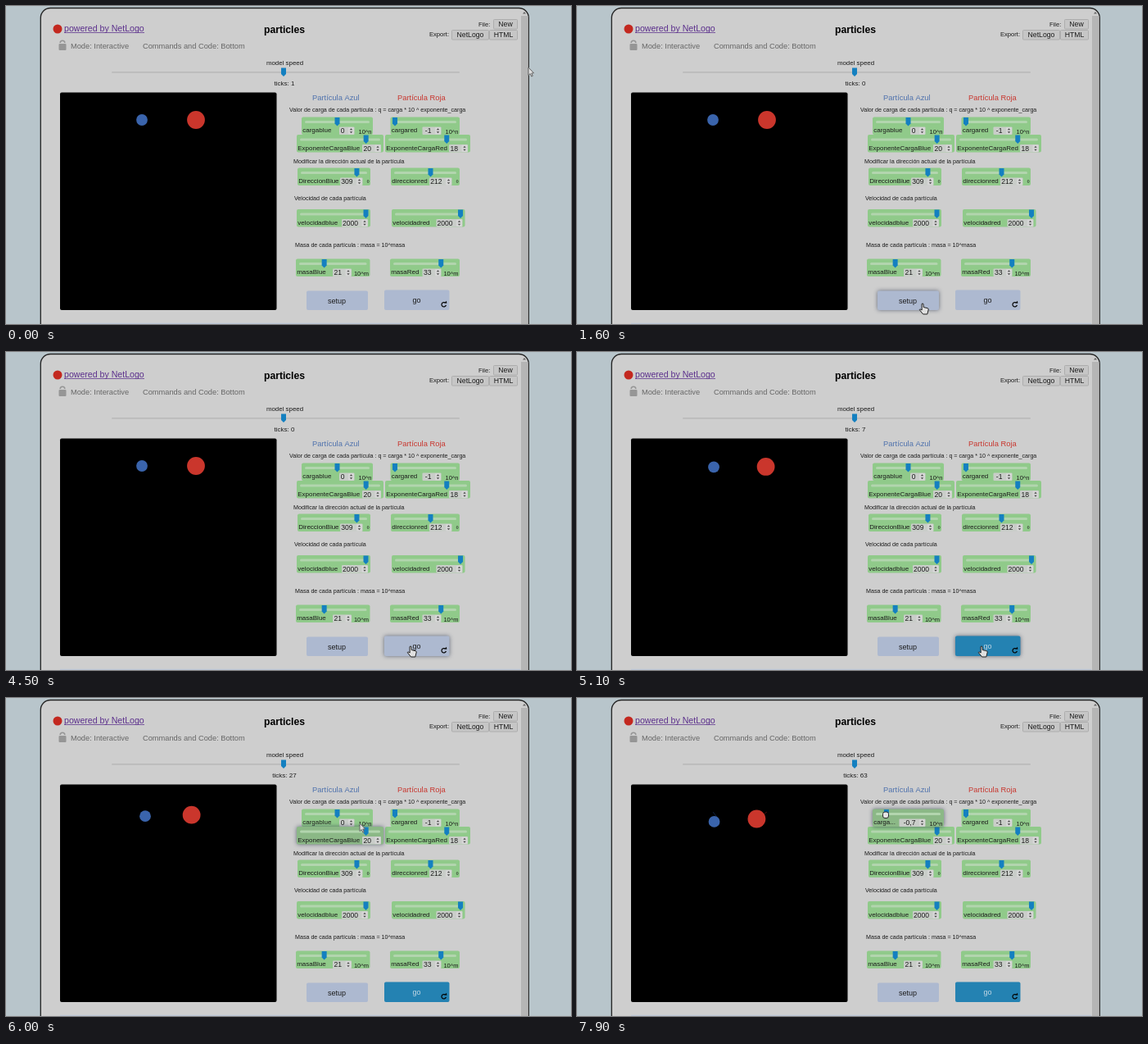
Animation of 690 by 388 pixels, one loop 8 s. Source, as an HTML page with a canvas:

```html
<!DOCTYPE html>
<html lang="es">
<head>
<meta charset="utf-8">
<title>particles</title>
<style>
  html, body { margin: 0; width: 100%; height: 100%; overflow: hidden; background: #b8c5cb; }
  canvas { display: block; }
</style>
</head>
<body>
<canvas id="stage" width="690" height="388"></canvas>
<script>
const ctx = document.getElementById('stage').getContext('2d');
const DURATION = 8000, STEP = 100, HOVER_LAG = 150;
const SETUP_AT = 1400, GO_AT = 4700, GRAB_AT = 6400, DRAG_AT = 7000, DRAG_END = 7800;
const INK = '#1c1c1c', BUTTON = '#adb9d0';

const smooth = u => u * u * (3 - 2 * u);
const linear = u => u;

// Keys are [time, value, ...]
const pointerKeys = [[150, 638, 75], [500, 500, 358], [680, 422, 363], [1900, 422, 363], [2500, 494, 359],
  [5200, 494, 359], [6000, 432, 153], [GRAB_AT, 404, 141], [DRAG_AT, 404, 141], [DRAG_END, 377, 142]];
const tickKeys = [[4800, 0], [5100, 7], [6000, 27], [7900, 63]];

// Particle places after n ticks; blue is repelled once its charge is changed
const blueAt = n => [166 + 0.148 * n - 0.024 * Math.max(0, n - 45) ** 2, 139 + 0.19 * n];
const redAt = n => [232 - 0.2 * n, 139 + 0.135 * n];

const rows = [
  { y: 135.5, min: -1, max: 1, unit: '10^n', items: [['cargablue', 361, 87, 0], ['cargared', 469.5, 84.5, -1]] },
  { y: 157, min: 0, max: 24, unit: '', items: [['ExponenteCargaBlue', 355, 106, 20], ['ExponenteCargaRed', 463, 104, 18]] },
  { y: 197.5, min: 0, max: 360, unit: 'º', items: [['DireccionBlue', 356, 89, 309], ['direccionred', 470, 84, 212]] },
  { y: 248, min: 0, max: 2000, unit: '', items: [['velocidadblue', 355, 90, 2000], ['velocidadred', 471, 89.5, 2000]] },
  { y: 308.5, min: 10, max: 40, unit: '10^m', items: [['masaBlue', 354, 90.5, 21], ['masaRed', 469, 85, 33]] },
];
const sliders = rows.flatMap(({ items, ...row }) =>
  items.map(([name, x, w, value]) => ({ ...row, name, x, w, value })));
const setupBox = [367, 347.5, 75, 23.5], goBox = [462, 346.5, 79.5, 24.5];

function at(keys, t, ease) {
  const next = keys.findIndex(k => k[0] > t);
  if (next === 0) return keys[0].slice(1);
  if (next < 0) return keys[keys.length - 1].slice(1);
  const a = keys[next - 1], b = keys[next], u = ease((t - a[0]) / (b[0] - a[0]));
  return a.slice(1).map((v, i) => v + (b[i + 1] - v) * u);
}

function text(s, x, y, size, color = INK, align = 'left', weight = '') {
  ctx.font = `${weight} ${size}px "Liberation Sans", Arial, sans-serif`;
  ctx.textAlign = align;
  ctx.fillStyle = color;
  ctx.fillText(s, x, y);
}

function box(x, y, w, h, r, fill, stroke, hovered) {
  ctx.save();
  ctx.beginPath();
  ctx.roundRect(x, y, w, h, r);
  if (hovered) { ctx.shadowColor = 'rgba(40,50,75,.65)'; ctx.shadowBlur = 5; }
  ctx.fillStyle = fill;
  ctx.fill();
  ctx.restore();
  if (stroke) { ctx.strokeStyle = stroke; ctx.stroke(); }
}

function polygon(points, fill, stroke) {
  ctx.beginPath();
  points.forEach(([x, y]) => ctx.lineTo(x, y));
  ctx.closePath();
  ctx.fillStyle = fill;
  ctx.fill();
  if (stroke) { ctx.strokeStyle = stroke; ctx.stroke(); }
}

function disc(x, y, r, fill) {
  ctx.beginPath();
  ctx.arc(x, y, r, 0, 7);
  ctx.fillStyle = fill;
  ctx.fill();
}

const inside = ([px, py], [x, y, w, h]) => px >= x && px <= x + w && py >= y && py < y + h;
const area = s => [s.x, s.y, s.w, 21.5];

function thumb(x, y) {
  polygon([[x - 3, y], [x + 3, y], [x + 3, y + 7.5], [x, y + 10.5], [x - 3, y + 7.5]], '#1480c0');
}

function slider({ name, x, y, w, value, min, max, unit }, hovered) {
  const right = x + w, share = (value - min) / (max - min);
  const number = String(value).replace('.', ',');
  const label = Number.isInteger(value) ? name : name.slice(0, 5) + '...';
  const spin = right - (unit.length > 1 ? 26.5 : unit ? 13.5 : 7);
  const inputWidth = 14 + 4.5 * number.length;

  box(...area(s = { x, y, w }), 2, hovered ? '#8bb886' : '#90ca8a', null, hovered);
  box(x + 4, y + 4.5, w - 8, 3, 1.5, '#b2d5ae');
  box(spin + 4 - inputWidth, y + 12, inputWidth, 9.5, 1, '#c9cdc9');
  thumb(x + 5.5 + share * (w - 11), y + 0.5);
  text(label, x + 1.2, y + 18.8, 8);
  text(number, spin - 8, y + 19.8, 8.6, INK, 'right');
  box(spin - 3.5, y + 12.5, 7, 8.5, 1, '#d6d6d6');
  for (const dir of [-1, 1]) {
    const base = y + 16.8 + dir;
    polygon([[spin - 1.7, base], [spin, base + dir * 2], [spin + 1.7, base]], '#444');
  }
  text(unit, right - 1.5, y + 20, 7.5, INK, 'right');
}

function header(ticks) {
  disc(63, 28, 5.5, '#c3281f');
  text('powered by NetLogo', 71, 31, 10.6, '#5b2f8c');
  box(71, 32.3, 98, 0.8, 0, '#5b2f8c');
  ctx.lineWidth = 1.6;
  ctx.strokeStyle = '#969696';
  ctx.beginPath();
  ctx.arc(69, 45, 2.8, Math.PI, 0);
  ctx.stroke();
  ctx.lineWidth = 1;
  box(64.5, 46, 9, 8, 1, '#969696');
  text('Mode: Interactive', 79, 52, 9.27, '#666');
  text('Commands and Code: Bottom', 167, 52, 9.27, '#666');
  text('particles', 340, 32.5, 12.2, '#000', 'center', 'bold');
  text('File:', 577, 25, 7.6);
  text('Export:', 517, 37, 7.6);
  for (const [s, x, y, w] of [['New', 595.5, 16.5, 29], ['NetLogo', 544.5, 29.5, 45], ['HTML', 590.5, 29.5, 34]]) {
    box(x, y, w, 11.5, 1, '#c6c6c6', '#adadad');
    text(s, x + w / 2, y + 8.8, 8.7, INK, 'center');
  }
  text('model speed', 340.5, 72, 7.9, INK, 'center');
  box(129, 80.2, 425, 1.4, 0.7, '#b4b4b4');
  thumb(339, 75.5);
  text('ticks: ' + ticks, 340, 96.5, 8.05, INK, 'center');
}

function labels() {
  text('Partícula Azul', 374, 115, 9.35, '#4f72ad');
  text('Partícula Roja', 478, 114.5, 9.35, '#c8372f');
  text('Valor de carga de cada partícula : q = carga * 10 ^ exponente_carga', 346, 129, 7.13);
  text('Modificar la dirección actual de la partícula', 351, 191.5, 7.18);
  text('Velocidad de cada partícula', 352, 236.5, 7.15);
  text('Masa de cada partícula : masa = 10^masa', 353, 293.5, 7.13);
}

function particle(place, n, r, color, trail) {
  ctx.beginPath();
  for (let i = 0; i <= n; i++) ctx.lineTo(...place(i));
  ctx.strokeStyle = trail;
  ctx.stroke();
  disc(...place(n), r, color);
}

function buttons(t, hover) {
  const running = t >= GO_AT;
  box(...setupBox, 2, BUTTON, null, inside(hover, setupBox));
  text('setup', 404, 363, 9, INK, 'center');
  box(...goBox, 2, running ? '#2482b2' : BUTTON, null, inside(hover, goBox));
  text('go', 501.5, 361.5, 9, running ? '#c3d8e4' : INK, 'center');
  ctx.lineWidth = 1.2;
  ctx.strokeStyle = '#000';
  ctx.beginPath();
  ctx.arc(534.7, 364.3, 2.7, 0.2, 5.3);
  ctx.stroke();
  ctx.lineWidth = 1;
  polygon([[535.3, 362.6], [538.3, 362.8], [538, 359.8]], '#000');
}

function cursor([x, y], t) {
  ctx.save();
  ctx.translate(x, y);
  if (t >= GRAB_AT) {
    box(-3.5, -3, 7, 7.5, 2.5, '#e4e4e4', '#2a2a2a');
  } else if (inside([x, y], setupBox) || inside([x, y], goBox)) {
    polygon([[-1, 0.5], [0, 0], [1, 0.5], [1.2, 4.5], [6.5, 5.8], [7.3, 7], [5.8, 13],
      [0.6, 13], [-3.8, 7.6], [-3, 6.8], [-0.8, 8]], '#e0e0e0', '#222');
  } else {
    polygon([[0, 0], [0, 9.5], [2.2, 7.6], [3.8, 11], [5.3, 10.3], [3.8, 7], [6.6, 6.8]], '#dedede', '#666');
  }
  ctx.restore();
}

function draw(t) {
  const pointer = at(pointerKeys, t, smooth), hover = at(pointerKeys, t - HOVER_LAG, smooth);
  const elapsed = at(tickKeys, t, linear)[0];

  box(0, 0, 690, 388, 0, '#b8c5cb');
  ctx.lineWidth = 1.3;
  box(42.3, 2.5, 596, 420, 12, '#cecece', '#222');
  ctx.lineWidth = 1;
  box(629, 12, 8.5, 376, 0, '#b5b5b5');
  polygon([[631, 9.5], [633, 7], [635, 9.5]], '#666');
  box(66, 386.8, 562, 1.2, 0, '#bcc6d6');

  header(t < SETUP_AT ? 1 : Math.round(elapsed));
  labels();
  box(66, 105.5, 264.5, 265.5, 2, '#000');
  particle(blueAt, elapsed, 6.9, '#3a64ac', '#1c3158');
  particle(redAt, elapsed, 10.9, '#ca362c', '#5c1713');

  // The first slider follows the drag
  const drag = t > DRAG_AT ? pointer[0] - 404 : 0;
  sliders[0].value = Math.round(drag / 3.8) / 10 || 0;
  const isHovered = s => inside(hover, area(s));
  sliders.filter(s => !isHovered(s)).forEach(s => slider(s, false));
  sliders.filter(isHovered).forEach(s => slider(s, true));
  buttons(t, hover);
  cursor(pointer, t);
}

function frame() {
  const t = performance.now() % DURATION;
  draw(Math.floor(t / STEP) * STEP);
  requestAnimationFrame(frame);
}
frame();
</script>
</body>
</html>
```
